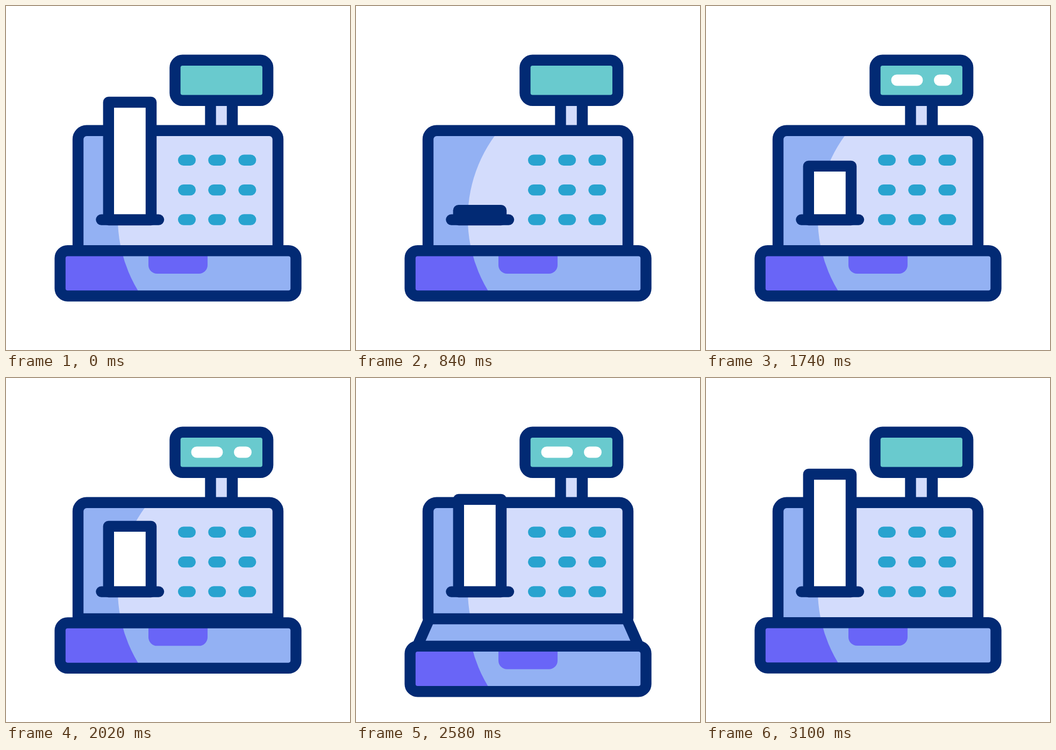
An HTML page with a canvas that plays this animation: 640x640 px, repeating every 3.6 s.

```html
<!DOCTYPE html>
<html lang="en">
<head>
<meta charset="utf-8">
<title>Cash register</title>
<style>
  html, body { margin: 0; width: 100%; height: 100%; overflow: hidden; background: #fff; }
  canvas { display: block; width: 640px; height: 640px; }
</style>
</head>
<body>
<canvas id="stage" width="640" height="640"></canvas>
<script>
const ctx = document.getElementById('stage').getContext('2d');
const LOOP = 3600;
const NAVY = '#022a74', PALE = '#d3dcfc', BLUE = '#93b1f3', PURPLE = '#6965f7',
      TEAL = '#69cace', KEY = '#28a3cf', WHITE = '#fff';

const ramp = (t, a, b) => Math.min(1, Math.max(0, (t - a) / (b - a)));
const ease = (t, a, b) => { const p = ramp(t, a, b); return p * p * (3 - 2 * p); };

// Height of the printed receipt's top edge: [time, y]
const PRINT = [[720, 398], [1260, 318.5], [1740, 298], [2260, 257], [2580, 226], [3100, 179]];
// Key presses: [column, row, time]
const PRESSES = [[2, 0, 1260], [1, 2, 2260]];

function printTop(t) {
  let y = PRINT[0][1];
  for (let i = 1; i < PRINT.length; i++) {
    const [t0, y0] = PRINT[i - 1], [t1, y1] = PRINT[i];
    y += (y1 - y0) * ramp(t, t0, t1);
  }
  return y;
}

function shape(path, fill, outlined = true) {
  if (fill) { ctx.fillStyle = fill; ctx.fill(path); }
  if (outlined) ctx.stroke(path);
}

function box(x, y, w, h, r) {
  const path = new Path2D();
  path.roundRect(x, y, w, h, r);
  return path;
}

const line = (...points) => new Path2D('M' + points.join(' '));
const pill = (x, y, w, h, color) => shape(box(x, y, w, h, h / 2), color, false);

// Outlined panel with a shaded left side
function panel(path, shade, light, extra) {
  ctx.save();
  ctx.clip(path);
  shape(path, shade, false);
  ctx.fillStyle = light;
  ctx.beginPath();
  ctx.arc(468, 395, 260, 0, 7);
  ctx.rect(468, 135, 100, 520);
  ctx.fill();
  if (extra) extra();
  ctx.restore();
  ctx.stroke(path);
}

function paper(top, bottom) {
  if (bottom - top > 1) shape(box(190.8, top, 79.2, bottom - top, 0), WHITE);
}

// Torn receipt whose upper edge bends forward by k
function tornPaper(k, drop) {
  const top = 179 - 64 * k + drop, bottom = 398 - 166 * k + drop;
  paper(top + 26 * k, bottom);
  if (k <= 0) return;
  const s = 12 * k, edge = top + 26 * k, l = 190.8, r = 270.5;
  shape(new Path2D(`M${l - s} ${edge}C${l - s} ${top + 11 * k} ${l - s / 2} ${top} ${l} ${top}
    H${r}C${r + s / 2} ${top} ${r + s} ${top + 11 * k} ${r + s} ${edge}Z`), WHITE);
}

function keys(t) {
  for (let row = 0; row < 3; row++)
    for (let col = 0; col < 3; col++)
      pill(320 + 56.2 * col, 276.5 + 55.4 * row, 33, 20.5, KEY);
  for (const [col, row, at] of PRESSES) {
    const a = ease(t, at - 120, at - 40) - ease(t, at + 40, at + 120);
    const g = 1.7 * a;
    ctx.globalAlpha = a;
    pill(320 + 56.2 * col - g, 276.5 + 55.4 * row - g, 33 + 2 * g, 20.5 + 2 * g, WHITE);
    ctx.globalAlpha = 1;
  }
}

function display(t) {
  shape(box(380.5, 170, 40.5, 70, 0), PALE);
  shape(box(314.5, 100.8, 172.7, 75, 14), TEAL);
  ctx.globalAlpha = ease(t, 1060, 1180) - ease(t, 2800, 2920);
  pill(344.5, 127.5, 59, 21, WHITE);
  pill(424, 127.5, 33, 21, WHITE);
  ctx.globalAlpha = 1;
}

function drawer(offset) {
  if (offset > 0) shape(line(136.5, 448, 110, 508, 530, 508, 503.5, 448), BLUE);
}

function drawerFront(offset) {
  ctx.save();
  ctx.translate(0, offset);
  panel(box(100.6, 455.2, 438.9, 84.3, 14), PURPLE, BLUE,
    () => shape(box(265, 440, 110, 58, 16), PURPLE, false));
  ctx.restore();
}

function draw(t) {
  ctx.fillStyle = WHITE;
  ctx.fillRect(0, 0, 640, 640);
  ctx.strokeStyle = NAVY;
  ctx.lineWidth = 20.4;
  ctx.lineJoin = ctx.lineCap = 'round';

  const lift = ease(t, 120, 440);
  const fall = 170 * ease(t, 480, 720);
  const offset = 43.7 * (ease(t, 2000, 2400) - ease(t, 2600, 3000));

  display(t);
  if (lift === 1 && t < 720) tornPaper(1, fall);
  drawer(offset);
  panel(box(134, 231.8, 372, (offset > 0 ? 448 : 470) - 231.8, [16, 16, 2, 2]), BLUE, PALE);
  keys(t);
  if (lift < 1) tornPaper(lift, 0);
  else if (t > 720) paper(printTop(t), 398);
  ctx.stroke(line(177.4, 397.6, 284, 397.6));
  drawerFront(offset);
}

const start = performance.now();
function tick() {
  draw((performance.now() - start) % LOOP);
  requestAnimationFrame(tick);
}
tick();
</script>
</body>
</html>
```
